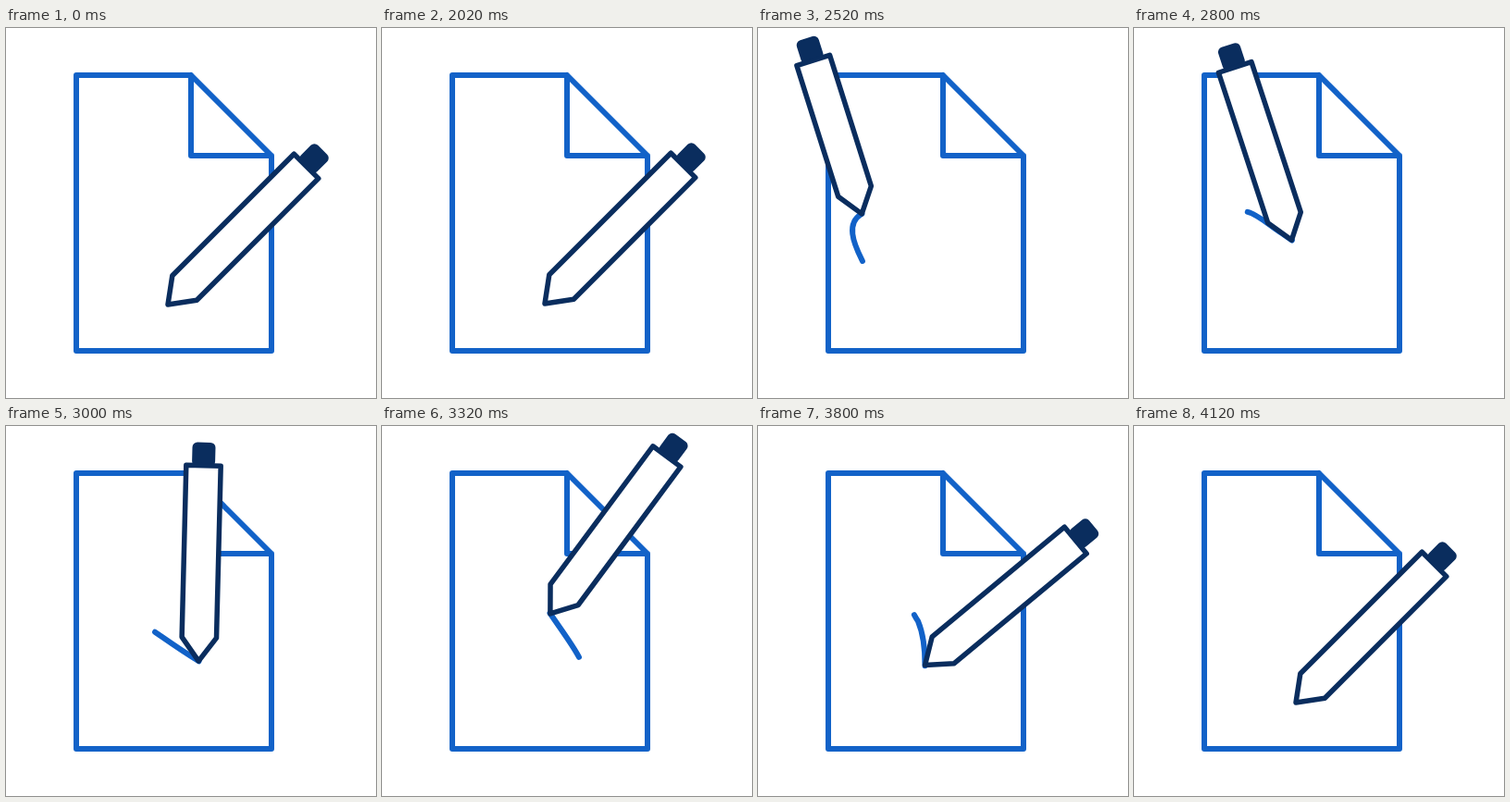
Recreate the animation shown at these times as an HTML page. Size 400 by 400 pixels, loop 4.15 s.

```html
<!DOCTYPE html>
<html lang="en">
<head>
<meta charset="utf-8">
<title>Writing pen</title>
<style>
  html, body { margin: 0; width: 100%; height: 100%; overflow: hidden; background: #fff; }
  svg { display: block; width: 100%; height: 100%; }
  path { stroke-linecap: round; stroke-linejoin: round; }
  .blue { fill: none; stroke: #1262c8; stroke-width: 6; }
  .navy { fill: #fff; stroke: #0a2d5e; stroke-width: 5.5; }
</style>
</head>
<body>
<svg viewBox="0 0 400 400">
  <path class="blue" d="M200 51H76V349H287V138L200 51V138H287"/>
  <path class="blue" id="trail"/>
  <g id="pen">
    <rect id="cap" x="-12.5" width="25" height="26" rx="5.5" fill="#0a2d5e"/>
    <path class="navy" id="body"/>
  </g>
</svg>
<script>
const LOOP = 4150, START = 2020, END = 4120;
const TRAIL = 57, NIB = 25.5, HALF = 18.7, BODY = 186;
const [trail, pen, cap, body] = ['trail', 'pen', 'cap', 'body'].map(id => document.getElementById(id));

// The written stroke, split where the timing changes.
const strokes = [
  'M175 299C160 306 134 297 112 250C103 232 95 211 112 201',
  'C124 192 140 209 160 222C176 233 190 243 208 254',
  'C217 260 217 257 213 250C207 238 195 222 182 203',
  'C173 192 166 185 166 192C166 200 169 205 173 211',
  'C181 230 184 270 175 299'
];
let outline = '';
const lengths = strokes.map(part => {
  outline += part;
  trail.setAttribute('d', outline);
  return trail.getTotalLength();
});

// Keys are [time in ms, value, speed per second].
const travel = [
  [START, 0, 0], [2520, lengths[0], 260], [3000, lengths[1], 225],
  [3320, lengths[2], 195], [3570, lengths[3], 185], [END, lengths[4], 0]
];
const tilt = [
  [START, 45, 0], [2520, -17.5, -60], [3000, 1.3, 140],
  [3320, 36.5, 60], [3570, 46.7, 55], [END, 45, 0]
];
const bodyLength = [
  [2300, BODY, 0], [2535, 148, 0], [3000, BODY, 0]
];

const clamp = (x, low, high) => Math.min(high, Math.max(low, x));

function sample(keys, time) {
  const t = clamp(time, keys[0][0], keys[keys.length - 1][0]);
  const i = Math.max(1, keys.findIndex(key => key[0] >= t));
  const [t0, a, va] = keys[i - 1], [t1, b, vb] = keys[i];
  const u = (t - t0) / (t1 - t0), w = 1 - u, span = (t1 - t0) / 1000;
  return a + (b - a) * u * u * (3 - 2 * u) + span * u * w * (va * w - vb * u);
}

function draw(t) {
  const moving = t >= START && t < END;
  const head = moving ? sample(travel, t) : 0;
  const tip = trail.getPointAtLength(head);
  const lift = moving ? Math.max(0, 1 - (t - START) / 150) : 0;
  const angle = moving ? sample(tilt, t) : 45;
  const base = -NIB, top = base - sample(bodyLength, t);

  const length = Math.min(head, TRAIL * clamp((END - t) / 300, 0, 1));
  trail.style.visibility = length > 0.5 ? 'visible' : 'hidden';
  trail.setAttribute('stroke-dasharray', `${length} 9999`);
  trail.setAttribute('stroke-dashoffset', length - head);

  body.setAttribute('d', `M0 0L${-HALF} ${base}V${top}H${HALF}V${base}Z`);
  cap.setAttribute('y', top - 25);
  pen.setAttribute('transform', `translate(${tip.x + lift} ${tip.y - lift}) rotate(${angle})`);
}

const began = performance.now();
function tick() {
  draw((performance.now() - began) % LOOP);
  requestAnimationFrame(tick);
}
tick();
</script>
</body>
</html>
```
